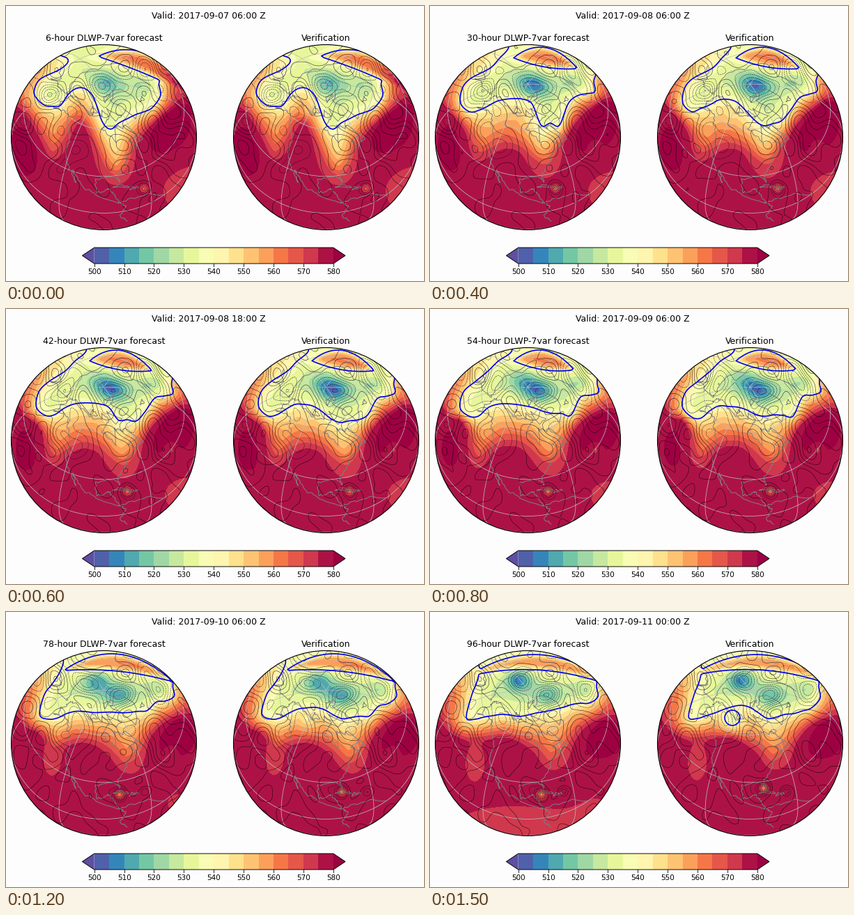
Write a matplotlib script that moves like this. It is 600 by 395 pixels and loops after 1600 ms.

```python
import numpy as np
import matplotlib.pyplot as plt
from matplotlib.animation import FuncAnimation
from matplotlib.patches import Circle, Polygon
from matplotlib.path import Path

W, H, DPI = 600, 395, 75
CX, CY, R = 140.5, 188.5, 133
SHIFT = 319
LON0, LAT0 = -91, np.radians(55)
HOURS = range(6, 97, 6)
BG = "#fdfdfd"

X, Y = np.meshgrid(np.linspace(CX - R - 3, CX + R + 3, 100),
                   np.linspace(CY - R - 3, CY + R + 3, 100))

# Shapes are set at these hours and blended in between.
KEYS = [6, 30, 54, 96]

# Cold region: x of its left side, its span, and y along its lower edge
LEFT = [[50, 88, 80, 50, 41], [113, 100, 86, 58, 46],
        [118, 98, 83, 65, 48], [62, 70, 70, 66, 60]]
SPAN = [[42, 222], [44, 237], [43, 242], [52, 241]]
LOW_START = [130, 142, 144, 143, 126, 118, 119, 132,
             166, 177, 168, 162, 156, 152, 146, 128]
LOW_FORECAST = [
    LOW_START,
    [140, 152, 150, 144, 137, 134, 133, 134, 141, 172, 168, 172, 140, 129, 126, 123],
    [142, 154, 154, 142, 137, 136, 137, 139, 142, 147, 150, 150, 153, 127, 124, 120],
    [152, 154, 151, 149, 147, 148, 150, 148, 145, 143, 140, 137, 133, 131, 131, 122]]
LOW_VERIFY = [
    LOW_START,
    [140, 152, 147, 142, 135, 134, 138, 150, 164, 172, 169, 165, 150, 132, 127, 122],
    [140, 155, 157, 146, 139, 140, 141, 145, 152, 154, 152, 153, 154, 126, 124, 119],
    [151, 153, 149, 145, 140, 136, 134, 137, 145, 153, 151, 147, 146, 142, 138, 124]]

# y of the 575 dam line at even steps across the globe
EDGE = [[140, 156, 192, 216, 194, 168, 205, 239, 239, 200, 174, 155, 144, 140],
        [130, 153, 176, 210, 212, 205, 208, 220, 222, 200, 170, 151, 140, 140],
        [130, 157, 164, 212, 206, 197, 199, 212, 222, 212, 173, 156, 150, 150],
        [150, 174, 184, 184, 182, 180, 187, 201, 222, 210, 184, 164, 157, 155]]

# Warm strip beyond the pole: left, right, half width, curvature
WARM = [[132, 280, 15, 0.0035], [120, 212, 14, 0.004],
        [120, 207, 14, 0.004], [55, 265, 11, 0.0025]]

# Highs and lows: sx, sy, then x, y, strength at the start and at the end
HEIGHT = [
    (14, 12, 143, 110, -3, 127, 97, -25),
    (16, 12, 143, 112, -14, 170, 121, -14),
    (15, 12, 195, 110, -7, 224, 108, -8),
    (20, 26, 32, 92, 15, 30, 118, 9),
    (16, 26, 248, 108, 13, 256, 118, 10),
    (16, 26, 157, 210, -11, 188, 190, -4),
    (12, 20, 70, 192, -4, 63, 216, -6),
    (18, 32, 28, 205, 5, 36, 195, 2),
    (30, 32, 228, 182, 5, 242, 186, 4),
    (34, 34, 262, 260, -5, 245, 264, -2),
]
SURFACE = [
    (17, 24, 33, 208, 3, 40, 200, 3),
    (25, 24, 238, 192, 3, 235, 188, 3),
    (14, 13, 145, 113, -5, 165, 120, -6),
    (12, 12, 60, 126, -4, 128, 98, -5),
    (13, 13, 195, 108, -3, 226, 108, -6),
    (18, 20, 160, 200, 2, 125, 200, 2),
    (16, 20, 98, 215, -2, 108, 158, -3),
    (5, 5, 230, 263, 0, 192, 257, -3),
]


def blend(rows, h):
    return np.array([np.interp(h, KEYS, c) for c in zip(*rows)])


def gauss(x, y, sx, sy):
    return np.exp(-((X - x) / sx) ** 2 / 2 - ((Y - y) / sy) ** 2 / 2)


def blobs(rows, h):
    u = (h - 6) / 90
    total = 0
    for sx, sy, *ends in rows:
        x, y, s = np.array(ends[:3]) * (1 - u) + np.array(ends[3:]) * u
        total = total + s * gauss(x, y, sx, sy)
    return total


def smooth(p, closed=True, n=4):
    """Catmull-Rom curve through the points."""
    if closed:
        q = np.vstack([p[-1:], p, p[:2]])
    else:
        q = np.vstack([p[:1], p, p[-1:]])
    a, b, c, d = (v[:, None] for v in (q[:-3], q[1:-2], q[2:-1], q[3:]))
    t = (np.arange(n) / n)[None, :, None]
    out = b + t * (c - a) / 2 + t**2 * (a - 2.5 * b + 2 * c - d / 2) \
        + t**3 * (1.5 * (b - c) + (d - a) / 2)
    return np.vstack([out.reshape(-1, 2), p[:1] if closed else p[-1:]])


def distance(c):
    (x0, y0), (dx, dy) = c[:-1].T, np.diff(c, axis=0).T
    px, py = X[..., None] - x0, Y[..., None] - y0
    t = np.clip((px * dx + py * dy) / (dx**2 + dy**2 + 1e-9), 0, 1)
    return np.sqrt(((px - t * dx) ** 2 + (py - t * dy) ** 2).min(-1))


def signed(p):
    c = smooth(p)
    inside = Path(c).contains_points(np.c_[X.ravel(), Y.ravel()])
    return np.where(inside.reshape(X.shape), -1, 1) * distance(c)


def cold_outline(h, verify):
    x0, x1 = blend(SPAN, h)
    low = blend(LOW_VERIFY if verify else LOW_FORECAST, h)
    return np.vstack([
        np.c_[blend(LEFT, h), np.linspace(60, 119, 5)],
        np.c_[np.linspace(x0, x1, 16), low],
        [(x1 - 2, 108), (238, 88), (215, 50), (120, 35)]])


rng = np.random.default_rng(7)
angle, size = rng.uniform(0, np.pi, 9), 2 * np.pi / rng.uniform(26, 70, 9)
phase, speed = rng.uniform(0, 6.3, 9), rng.uniform(-0.02, 0.02, 9)


def fields(h, verify):
    """Distance to the 540 line, 500 hPa height and surface height."""
    u = (h - 6) / 90
    late = max(0, (h - 66) / 30)

    x0, x1, half, bend = blend(WARM, h)
    reach = (2 * X - x0 - x1) / (x1 - x0)
    hole = half * (1 - reach**2) - abs(Y - 72 - bend * (X - 145) ** 2)
    sd = np.maximum(signed(cold_outline(h, verify)), hole)
    if verify:
        sd = np.minimum(sd, np.hypot(X - 115, Y - 152) - (19 * late - 8))

    ey = blend(EDGE, h)
    e = smooth(np.c_[np.linspace(5, 272, len(ey)), ey], closed=False)
    b = distance(e)
    a = np.maximum(sd, 0)
    south = Y > np.interp(X, e[:, 0], e[:, 1])
    z = np.where(south, 575 + 2.6 * (1 - np.exp(-b / 9)), 540 + 35 * a / (a + b + 0.1))
    z += np.where(sd > 0, np.clip(hole * 2, 0, 17), 0)
    z = np.where(sd < 0, 540 - 12 * (1 - np.exp(np.minimum(sd, 0) / 14)), z)
    z += blobs(HEIGHT, h)
    z -= 10 * np.sin(np.pi * u) * gauss(152, 119, 14, 11)
    z -= 7 * np.sin(np.pi * u) * gauss(237, 202, 6, 7)
    dry = (0.6 * u + 4 * late) * (0.5 if verify else 1)
    z -= dry * np.exp(-((Y - 320) / 55) ** 2 - ((X - 120) / 130) ** 2)

    sx = 154 + 44 * np.exp(-(h - 6) / 46)
    sy = 262 - (9 * late if verify else 0)
    depth = 11 + 8 * u
    z -= depth * gauss(sx, sy, 3.6, 3.6)

    drift = h * (1.25 if verify else 1)
    rough = sum(np.sin(k * (np.cos(g) * X + np.sin(g) * Y) + p + w * drift)
                for k, g, p, w in zip(size, angle, phase, speed))
    s = blobs(SURFACE, h) - 0.35 * depth * gauss(sx, sy, 6, 6) + 0.2
    s += rough * np.interp(Y, [60, 150, 240, 320], [0.5, 0.42, 0.22, 0.12])
    return sd, z, s


DATA = [[fields(h, v) for v in (False, True)] for h in HOURS]

# Coastlines as lon, lat
WEST = [-95, 72, -94, 68, -115, 68, -128, 70, -156, 71, -166, 68, -161, 64, -165, 61,
        -157, 58, -163, 55, -151, 60, -141, 60, -132, 55, -124, 48, -124, 40, -117, 32,
        -110, 23, -114, 31, -106, 22, -96, 16, -85, 11, -80, 8, -77, 5, -81, -4, -76, -14]
EAST = [-95, 72, -82, 68, -94, 60, -82, 55, -79, 51, -77, 62, -69, 59, -64, 60, -56, 52,
        -67, 50, -60, 46, -70, 43, -76, 35, -81, 31, -80, 25, -84, 30, -97, 28, -96, 19,
        -91, 19, -87, 21, -84, 15, -81, 9, -75, 11, -62, 10, -50, 0]
ASIA = [8, 60, 25, 71, 60, 69, 100, 77, 140, 73, 180, 69, 190, 66, 162, 58,
        158, 52, 160, 61, 140, 54]
ISLANDS = [
    [-72, 78, -54, 71, -48, 60, -22, 70, -18, 80, -40, 83],
    [-85, 73, -62, 66, -74, 64], [-88, 77, -62, 82, -92, 81],
    [-116, 73, -102, 70, -116, 69], [-59, 47, -55, 51, -53, 47],
    [-85, 22, -80, 23, -74, 20], [-74, 18, -72, 20, -68, 18],
    [-24, 65, -14, 65, -19, 63]]


def project(lon, lat):
    d, f = np.radians(lon - LON0), np.radians(lat)
    x = np.cos(f) * np.sin(d)
    y = np.cos(LAT0) * np.sin(f) - np.sin(LAT0) * np.cos(f) * np.cos(d)
    front = np.sin(LAT0) * np.sin(f) + np.cos(LAT0) * np.cos(f) * np.cos(d) > 0
    return np.where(front, CX + R * x, np.nan), CY - R * y


def ragged(coast, n=6):
    """Subdivide a coast and roughen it."""
    p = np.reshape(coast, (-1, 2))
    i = np.arange(0, len(p) - 1 + 1e-9, 1 / n)
    q = np.array([np.interp(i, np.arange(len(p)), c) for c in p.T])
    wobble = rng.normal(0, 0.5, q.shape)
    wobble[:, ::n] = 0
    return q + wobble


fig = plt.figure(figsize=(W / DPI, H / DPI), dpi=DPI, facecolor=BG)
ax = fig.add_axes([0, 0, 1, 1])
ax.set_xlim(0, W)
ax.set_ylim(H, 0)
ax.axis("off")

coasts = [project(*ragged(c)) for c in (WEST, EAST, ASIA)]
coasts += [project(*ragged(c + c[:2], 4)) for c in ISLANDS]
arc = np.linspace(-180, 180, 361)
grid = [project(arc, 0 * arc + v) for v in range(-30, 61, 30)]
grid += [project(0 * arc + v, arc / 2) for v in range(-180, 180, 60)]
rims = []
for dx in (0, SHIFT):
    rim = ax.add_patch(Circle((CX + dx, CY), R, fill=False, ec="k", lw=1.1, zorder=9))
    rims.append(rim)
    for group, color, lw, z in ((grid, "#bdbdbd", 0.7, 3), (coasts, "#808080", 0.95, 4)):
        for x, y in group:
            ax.plot(x + dx, y, color=color, lw=lw, zorder=z, clip_path=rim)

# Colour bar
cmap = plt.get_cmap("Spectral_r")
left, right, top, bottom = 126.7, 469.8, 347, 370
mid, step = (top + bottom) / 2, (right - left) / 16
tips = (109.5, 487)
for i in range(16):
    x = left + i * step
    ax.fill_between([x, x + step], top, bottom, color=cmap((i + 0.5) / 16), lw=0)
for x, tip, v in zip((left, right), tips, (0.0, 1.0)):
    ax.add_patch(Polygon([(x, top), (tip, mid), (x, bottom)], fc=cmap(v), lw=0))
ax.add_patch(Polygon([(left, top), (right, top), (tips[1], mid), (right, bottom),
                      (left, bottom), (tips[0], mid)], fill=False, ec="k", lw=0.9))
for i in range(9):
    x = left + 2 * step * i
    ax.plot([x, x], [bottom, bottom + 3.8], color="k", lw=0.8)
    ax.text(x, 377.3, str(500 + 10 * i), size=10, ha="center", va="top")

valid = ax.text(290.5, 17.5, "", size=12, ha="center")
title = ax.text(CX, 50, "", size=12, ha="center")
ax.text(CX + SHIFT, 50, "Verification", size=12, ha="center")

shown = []


def draw(i):
    while shown:
        shown.pop().remove()
    h = HOURS[i]
    valid.set_text(f"Valid: 2017-09-{7 + h // 24:02d} {h % 24:02d}:00 Z")
    title.set_text(f"{h}-hour DLWP-7var forecast")
    for (sd, z, s), dx, rim in zip(DATA[i], (0, SHIFT), rims):
        sets = [
            ax.contourf(X + dx, Y, z, np.arange(500, 581, 5), cmap=cmap,
                        extend="both", zorder=1),
            ax.contour(X + dx, Y, s, np.arange(-12, 10), colors="k",
                       linewidths=0.5, alpha=0.85, zorder=5),
            ax.contour(X + dx, Y, sd, [0], colors="#0000e6", linewidths=1.6, zorder=6),
        ]
        for c in sets:
            c.set_clip_path(rim)
        shown.extend(sets)
    ax.set_xlim(0, W)
    ax.set_ylim(H, 0)
    return []


anim = FuncAnimation(fig, draw, frames=len(HOURS), interval=100, repeat=True)
plt.show()
```
